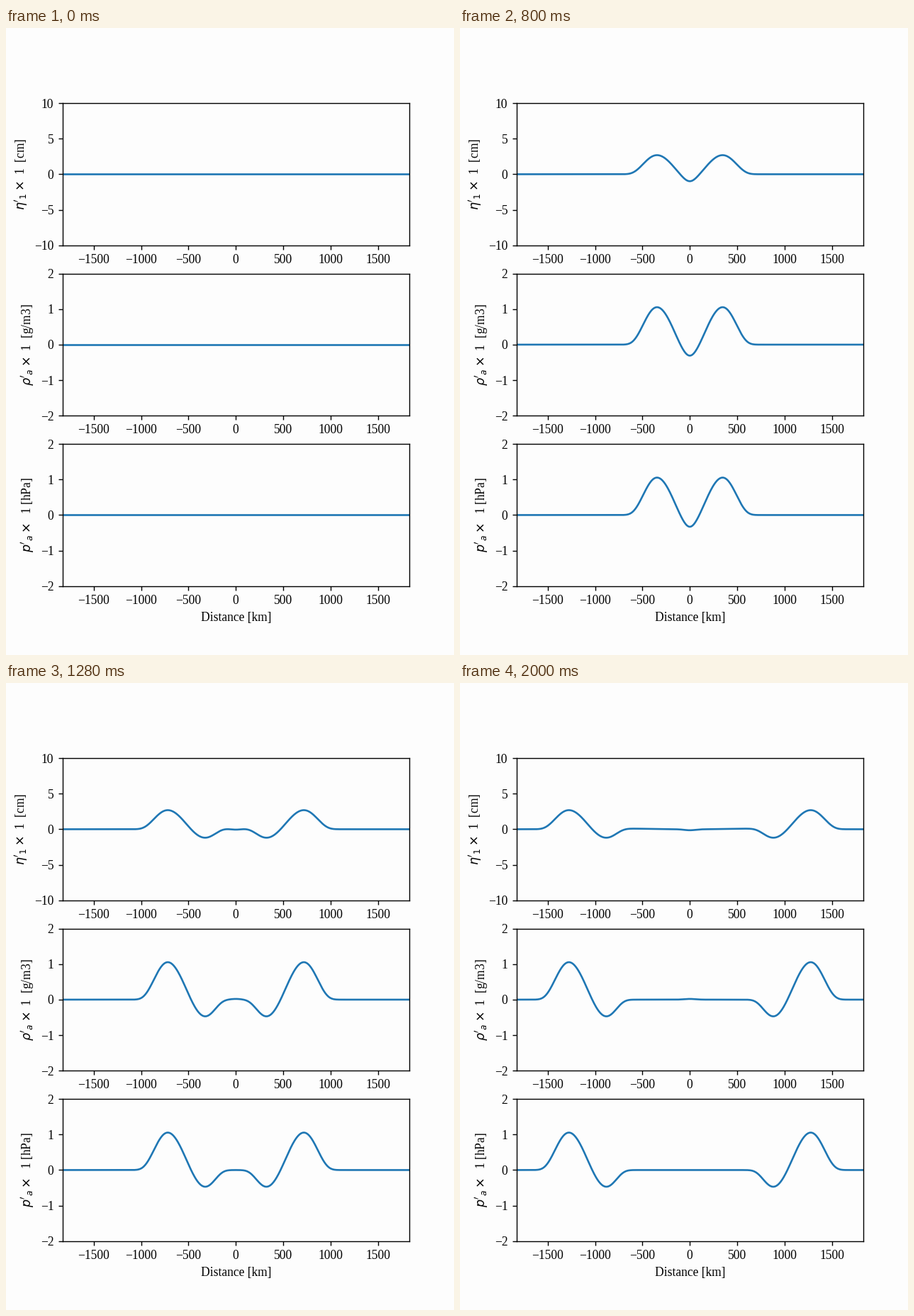
A matplotlib script that plays this animation: 632x885 px, repeating every 2.04 s.

```python
import numpy as np
import matplotlib.pyplot as plt
from matplotlib.animation import FuncAnimation

W, H, DPI = 632, 885, 126.4
FRAMES, STEP_MS = 51, 40
SPEED = 31.0    # km per frame
SPREAD = 45.0   # half width of the forcing, km
X_MAX = 1830

plt.rcParams.update({
    "font.family": "Liberation Serif",
    "font.size": 10,
    "mathtext.fontset": "dejavusans",
})

x = np.linspace(-X_MAX, X_MAX, 733)
offsets = np.linspace(-3.2, 3.2, 49) * SPREAD
weights = np.exp(-0.5 * (offsets / SPREAD) ** 2)
weights /= weights.sum()
# travel time from every part of the forcing to every point, in frames
delay = np.abs(x[:, None] - offsets) / SPEED


def pulse(t, tail):
    """Forcing strength over time: cosine easing between a few keys."""
    times = np.array([-0.6, 8.7, 21.6, 28.5, 46])
    values = np.array([0, 1.11, -0.52, tail, 0])
    i = np.clip(np.searchsorted(times, t) - 1, 0, len(times) - 2)
    u = np.clip((t - times[i]) / (times[i + 1] - times[i]), 0, 1)
    ease = 0.5 - 0.5 * np.cos(np.pi * u)
    return values[i] + (values[i + 1] - values[i]) * ease


def wave(t, scale, tail, residue):
    if t == 0:
        return np.zeros_like(x)
    moving = pulse(t - delay, tail) @ weights
    grow = np.clip((t - 6) / 10, 0, 1)
    return scale * moving + residue * grow * np.exp(-(x / 85) ** 2)


# label, y limit, y tick step, wave settings (scale, tail, residue)
PANELS = [
    (r"$\eta'_1 \times$ 1  [cm]", 10, 5, (2.55, 0.035, -0.14)),
    (r"$\rho'_a \times$ 1  [g/m3]", 2, 1, (1.0, 0.0, 0.02)),
    (r"$p'_a \times$  1 [hPa]", 2, 1, (1.0, 0.0, 0.0)),
]

fig, axes = plt.subplots(3, 1, figsize=(W / DPI, H / DPI), dpi=DPI)
fig.set_facecolor("#fdfdfd")
fig.subplots_adjust(left=79.6 / W, right=568.8 / W, bottom=0.11, top=0.88,
                    hspace=0.2)

lines = []
for ax, (label, limit, step, _) in zip(axes, PANELS):
    ax.set_facecolor("#fdfdfd")
    ax.set_xlim(-X_MAX, X_MAX)
    ax.set_ylim(-limit, limit)
    ax.set_xticks(range(-1500, 1501, 500))
    ax.set_yticks(range(-limit, limit + 1, step))
    ax.set_ylabel(label)
    lines += ax.plot(x, np.zeros_like(x), color="#1f77b4", lw=1.5)
axes[-1].set_xlabel("Distance [km]")


def update(t):
    for line, panel in zip(lines, PANELS):
        line.set_ydata(wave(t, *panel[3]))
    return lines


anim = FuncAnimation(fig, update, frames=FRAMES, interval=STEP_MS,
                     repeat=True, repeat_delay=0, blit=False)
plt.show()
```
